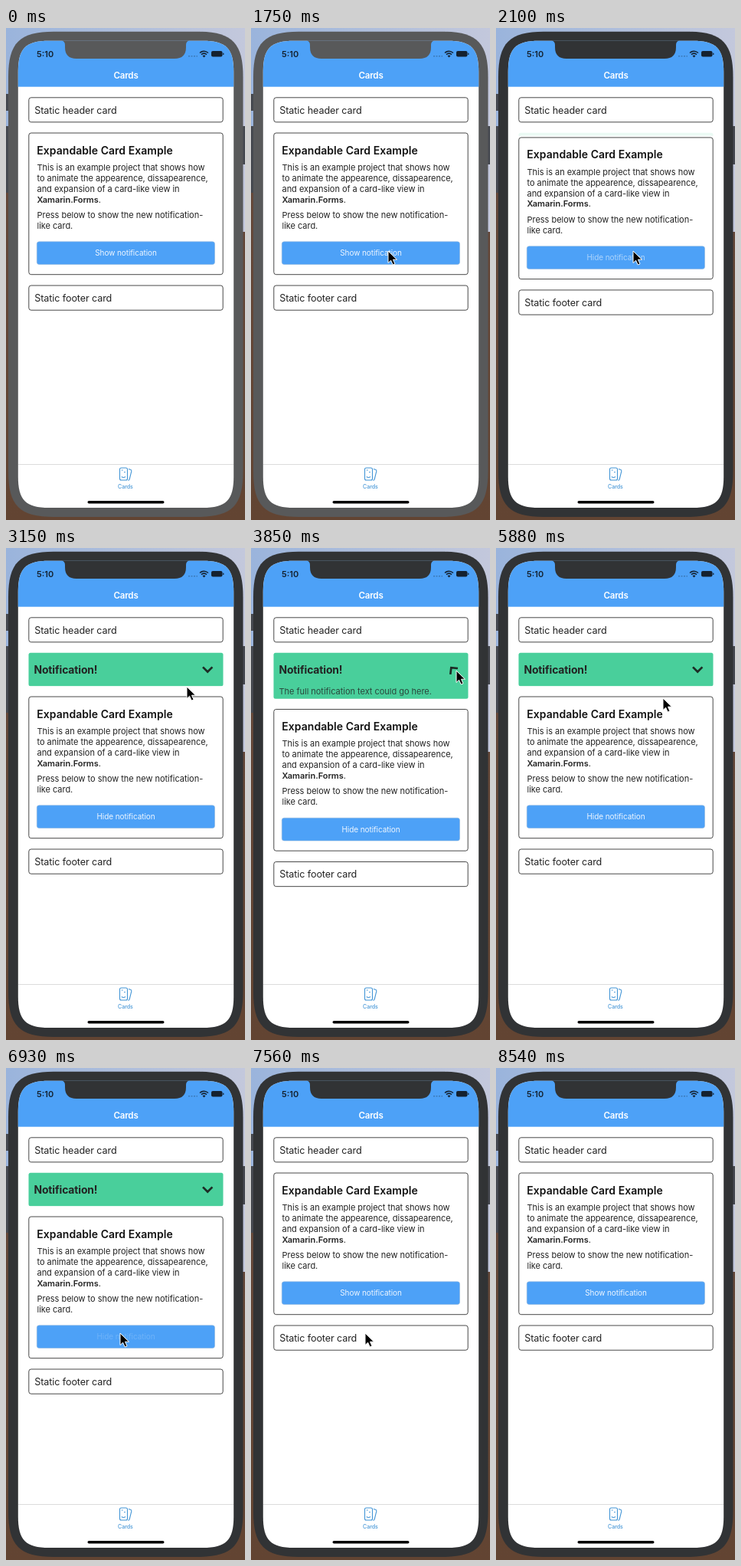
An HTML page for the animation above (8750 ms loop, 312x642 px).

```html
<!DOCTYPE html>
<html lang="en">
<head>
<meta charset="utf-8">
<title>Expandable card</title>
<style>
  html, body { margin: 0; width: 100%; height: 100%; overflow: hidden; background: #5f4333; }
  svg { display: block; width: 100%; height: 100%; font-family: Inter, Roboto, sans-serif; fill: #222; }
  .card { fill: #fff; stroke: #484848; }
  .blue { fill: #4da1f7; }
  .line { fill: none; stroke: #4395d6; stroke-width: 1.1; stroke-linejoin: round; }
  .label { font-size: 12.6px; letter-spacing: -.11px; }
  .body { font-size: 11px; letter-spacing: -.03px; }
  .heading { font-size: 14px; font-weight: 600; letter-spacing: .04px; fill: #111; }
  .alert { font-size: 13.9px; font-weight: 700; letter-spacing: -.12px; }
  .button { font-size: 10px; letter-spacing: -.08px; fill: #eef6ff; text-anchor: middle; }
  .nav { font-size: 11.6px; font-weight: 600; letter-spacing: -.2px; fill: #fff; text-anchor: middle; }
  .tab { font-size: 7px; font-weight: 500; fill: #4395d6; text-anchor: middle; }
  .time { font-size: 11px; font-weight: 600; fill: #14212f; }
</style>
</head>
<body>
<svg viewBox="0 0 312 642">
  <defs>
    <linearGradient id="sky">
      <stop offset="0" stop-color="#9ab4dc"/>
      <stop offset="1" stop-color="#c3c8dc"/>
    </linearGradient>
    <linearGradient id="ground" x2="0" y2="1">
      <stop offset="0" stop-color="#64483a"/>
      <stop offset="1" stop-color="#624432"/>
    </linearGradient>
    <clipPath id="screenClip"><path id="screenEdge"/></clipPath>
    <clipPath id="alertClip"><rect id="alertMask" x="29" y="136" width="255" height="0"/></clipPath>
  </defs>

  <rect width="312" height="270" fill="url(#sky)"/>
  <path d="M0 215H156V266H312V642H0z" fill="url(#ground)"/>
  <path d="M0 86h6v22h-6zM0 128h6v87h-6zM306 128h6v50h-6z" fill="#464950"/>

  <path id="frame" class="bezel"/>
  <g clip-path="url(#screenClip)">
    <rect x="15" y="16" width="283" height="612" fill="#fff"/>
    <rect class="blue" x="15" y="16" width="283" height="60.700"/>
  </g>
  <path class="bezel" d="M73 16.500H239Q235 17.500 235 22V25Q235 40 220 40H92Q77 40 77 25V22Q77 17.500 73 16.500z"/>

  <text class="time" x="40" y="38">5:10</text>
  <g fill="#14212f">
    <path d="M238 36h2v1.500h-2zm3.500 0h2v1.500h-2zm3.500 0h2v1.500h-2zm3.500 0h1.500v1.500h-1.500z" opacity=".3"/>
    <path d="M258.500 38.500l-2-2.200q2-1.600 4 0z"/>
    <path d="M255 34.600q3.500-3 7 0M253 32.500q5.500-4.600 11 0" fill="none" stroke="#14212f" stroke-width="1.500"/>
    <rect x="268" y="30" width="14.500" height="7.500" rx="2"/>
    <rect x="283.200" y="32.500" width="1.200" height="2.500" rx=".6"/>
  </g>
  <text class="nav" x="156.500" y="66">Cards</text>

  <rect class="card" x="29.800" y="90.800" width="253.400" height="32" rx="3"/>
  <text class="label" x="37.300" y="111.500">Static header card</text>

  <g id="alert" clip-path="url(#alertClip)">
    <rect id="alertBox" x="29.500" y="136.700" width="254" rx="2.500" fill="#49cf9b"/>
    <text class="alert" x="36.500" y="164">Notification!</text>
    <path id="chevron" d="M-6.200-3.100L0 3L6.200-3.100" fill="none" stroke="#1d2b25" stroke-width="2.700"/>
    <text id="detail" class="body" x="36.500" y="191">The full notification text could go here.</text>
  </g>

  <g id="stack">
    <rect class="card" x="29.800" y="137" width="253.400" height="184.700" rx="3"/>
    <text class="heading" x="40.300" y="164.500">Expandable Card Example</text>
    <g class="body">
      <text x="40.500" y="186">This is an example project that shows how</text>
      <text x="40.500" y="200">to animate the appearence, dissapearence,</text>
      <text x="40.500" y="213.800">and expansion of a card-like view in</text>
      <text x="40.500" y="227.500"><tspan font-weight="600">Xamarin.Forms</tspan>.</text>
      <text x="40.500" y="248">Press below to show the new notification-</text>
      <text x="40.500" y="262">like card.</text>
    </g>
    <rect class="blue" x="40.300" y="278.800" width="232.200" height="29.700" rx="3" stroke="#8fb6dc" stroke-width=".6"/>
    <text id="button" class="button" x="156.500" y="297.300"></text>
    <rect class="card" x="29.800" y="336" width="253.400" height="32.200" rx="3"/>
    <text class="label" x="37.300" y="357">Static footer card</text>
  </g>

  <path d="M16 569.500H297" stroke="#dcdcdc"/>
  <g class="line">
    <rect x="148.500" y="574" width="10" height="16" rx="2"/>
    <path d="M160 575.500l2.600.8q1.500.5 1.200 2l-2.600 10.500q-.4 1.500-1.800 1.300"/>
    <path d="M150.800 577h1.800M150.800 585.500q2.600 2 5.200 0M154 579.500h1.800"/>
  </g>
  <text class="tab" x="156" y="600.500">Cards</text>
  <rect x="106.500" y="617" width="100" height="3.500" rx="1.750" fill="#000"/>

  <path id="cursor" d="M0 0V15.500L3.600 12.200L6.200 18L9 16.800L6.500 11.200H11.500z" fill="#000" stroke="#fff" stroke-linejoin="round"/>
</svg>
<script>
const LOOP = 8750, STEP = 70;
const el = id => document.getElementById(id);
const bezels = document.querySelectorAll('.bezel');

// Cursor stops: time, x, y
const cursorStops = [
  [1050, 322, 440], [1610, 179, 291], [2520, 179, 291], [3150, 236, 181],
  [3430, 268, 160], [5320, 268, 160], [5880, 218, 196], [6650, 149, 346],
  [7700, 149, 346], [8330, 130, 660]
];

const clamp = v => Math.max(0, Math.min(1, v));
const smooth = v => v * v * (3 - 2 * v);
const ramp = (t, start, length) => smooth(clamp((t - start) / length));
const pulse = (t, on, off) => ramp(t, on, 70) - ramp(t, off, 140);

// Rectangle with corners that ease into their sides, close to radius r
function softRect(x0, y0, x1, y1, r) {
  const e = 1.35 * r, c = .331 * r;
  return `M${x0 + e} ${y0}H${x1 - e}C${x1 - c} ${y0} ${x1} ${y0 + c} ${x1} ${y0 + e}` +
    `V${y1 - e}C${x1} ${y1 - c} ${x1 - c} ${y1} ${x1 - e} ${y1}` +
    `H${x0 + e}C${x0 + c} ${y1} ${x0} ${y1 - c} ${x0} ${y1 - e}` +
    `V${y0 + e}C${x0} ${y0 + c} ${x0 + c} ${y0} ${x0 + e} ${y0}z`;
}

function cursorAt(t) {
  const next = cursorStops.findIndex(stop => stop[0] > t);
  if (next < 1) return [-50, -50];
  const [t0, x0, y0] = cursorStops[next - 1], [t1, x1, y1] = cursorStops[next];
  const k = ramp(t, t0, t1 - t0);
  return [x0 + (x1 - x0) * k, y0 + (y1 - y0) * k];
}

function draw(t) {
  const shown = ramp(t, 2030, 350) - ramp(t, 7210, 350);
  const opened = ramp(t, 3640, 300) - ramp(t, 4900, 300);
  const pressed = pulse(t, 1820, 2030) + pulse(t, 6860, 7210);
  const height = 43.5 + 21 * opened;
  const [x, y] = cursorAt(t);

  bezels.forEach(b => b.setAttribute('fill', t < 1820 ? '#58595a' : '#313335'));
  el('alert').setAttribute('opacity', shown);
  el('alertMask').setAttribute('height', (height + 1) * shown);
  el('alertBox').setAttribute('height', height);
  el('detail').setAttribute('opacity', opened);
  el('chevron').setAttribute('transform', `translate(263.2 158.5) rotate(${180 * opened})`);
  el('stack').setAttribute('transform', `translate(0 ${57 * shown + 21 * opened})`);
  el('button').textContent = (t >= 2030 && t < 7210 ? 'Hide' : 'Show') + ' notification';
  el('button').setAttribute('opacity', 1 - .8 * pressed);
  el('cursor').setAttribute('transform', `translate(${x} ${y})`);
}

function tick() {
  const t = performance.now() % LOOP;
  draw(Math.floor(t / STEP) * STEP);
  requestAnimationFrame(tick);
}

el('frame').setAttribute('d', softRect(3, 4.8, 309.5, 638, 44));
el('screenEdge').setAttribute('d', softRect(15.8, 16.8, 297.2, 626, 30));
tick();
</script>
</body>
</html>
```
